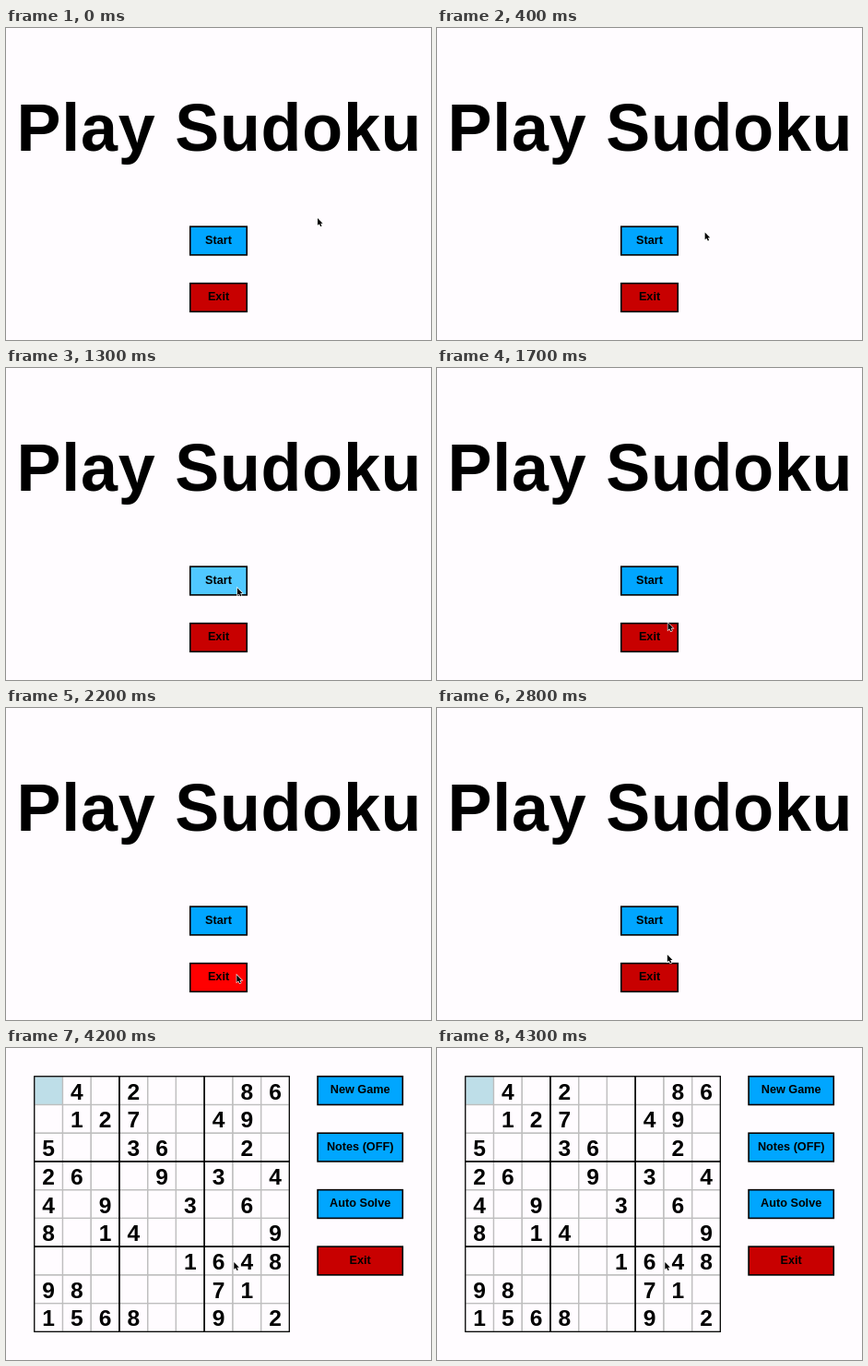
Write an HTML page with a canvas that moves like this. It is 461 px wide and 338 px high and loops after 5.3 s.

```html
<!DOCTYPE html>
<html lang="en">
<head>
<meta charset="utf-8">
<style>
html, body { margin: 0; width: 100%; height: 100%; overflow: hidden; background: #fffcff; }
canvas { display: block; }
</style>
</head>
<body>
<canvas id="stage" width="461" height="338"></canvas>
<script>
const ctx = document.getElementById('stage').getContext('2d');
const SCALE = 461 / 750; // the game window is 750 x 550 units
const CELL = 50, LOOP = 5300, STEP = 100, GAME_START = 4200;
const BLUE = ['#00a6ff', '#50c8ff'], RED = ['#c80000', '#ff0000'];
const ARROW = new Path2D('M0 0v7.8l1.8-1.6 1.3 2.9 1.4-.6-1.3-2.8h2.4z');

const puzzle = ('.4.2...86 .127..49. 5..36..2. 26..9.3.4 4.9..3.6. ' +
  '8.14....9 .....1648 98....71. 1568..9.2').split(' ');

// pointer stops: time, x, y; equal neighbours are rests
const open = [338, 206], onStart = [251, 234.5], onExit = [250.3, 289.2], between = [249.5, 249], click = [247.3, 232];
const stops = [
  [0, open], [600, onStart], [1200, onStart], [1800, onExit],
  [2400, onExit], [3000, between], [3400, click], [LOOP, click]
];

function pointerAt(t) {
  const i = stops.findIndex(s => s[0] > t);
  const [t0, a] = stops[i - 1], [t1, b] = stops[i];
  const e = ((t - t0) / (t1 - t0)) ** 1.5;
  return a.map((v, j) => v + (b[j] - v) * e);
}

function text(str, x, y, size, spacing = 0) {
  ctx.font = `bold ${size}px "Liberation Sans", Arial, sans-serif`;
  ctx.letterSpacing = spacing + 'px';
  ctx.fillStyle = '#000';
  ctx.fillText(str, x, y);
}

function button(label, x, y, w, colors, pointer) {
  const [px, py] = pointer.map(v => v / SCALE);
  const hover = px > x && px < x + w && py > y && py < y + 50;
  ctx.fillStyle = colors[+hover];
  ctx.fillRect(x, y, w, 50);
  ctx.strokeStyle = '#000';
  ctx.lineWidth = 2.6;
  ctx.strokeRect(x, y, w, 50);
  text(label, x + w / 2, y + 30.5, 20.6);
}

function grid(size, color) {
  ctx.strokeStyle = color;
  ctx.lineWidth = 2;
  for (let x = CELL; x < 10 * CELL; x += size)
    for (let y = CELL; y < 10 * CELL; y += size) ctx.strokeRect(x, y, size, size);
}

function drawMenu(pointer) {
  text('Play Sudoku', 376.5, 217, 117, 1.2);
  button('Start', 325, 350, 100, BLUE, pointer);
  button('Exit', 325, 450, 100, RED, pointer);
}

function drawGame(pointer) {
  ctx.fillStyle = '#bedee8';
  ctx.fillRect(CELL, CELL, CELL, CELL);
  grid(CELL, '#bebebe');
  grid(3 * CELL, '#000');
  puzzle.forEach((row, r) => [...row].forEach((digit, c) => {
    if (digit !== '.') text(digit, (c + 1.5) * CELL, (r + 1.5) * CELL + 15.5, 40);
  }));
  ['New Game', 'Notes (OFF)', 'Auto Solve', 'Exit'].forEach((label, i) =>
    button(label, 550, 50 + i * 100, 150, label === 'Exit' ? RED : BLUE, pointer));
}

function drawPointer([x, y]) {
  ctx.setTransform(1, 0, 0, 1, x, y);
  ctx.strokeStyle = '#fff';
  ctx.lineWidth = 1.2;
  ctx.stroke(ARROW);
  ctx.fillStyle = '#000';
  ctx.fill(ARROW);
}

function draw(now) {
  const t = Math.floor(now % LOOP / STEP) * STEP;
  const pointer = pointerAt(t);
  ctx.setTransform(SCALE, 0, 0, SCALE, 0, 0);
  ctx.fillStyle = '#fffcff';
  ctx.fillRect(0, 0, 750, 550);
  ctx.textAlign = 'center';
  ctx.fontKerning = 'none';
  (t < GAME_START ? drawMenu : drawGame)(pointer);
  drawPointer(pointer);
}

const start = performance.now();
function tick() {
  draw(performance.now() - start);
  requestAnimationFrame(tick);
}
tick();
</script>
</body>
</html>
```
